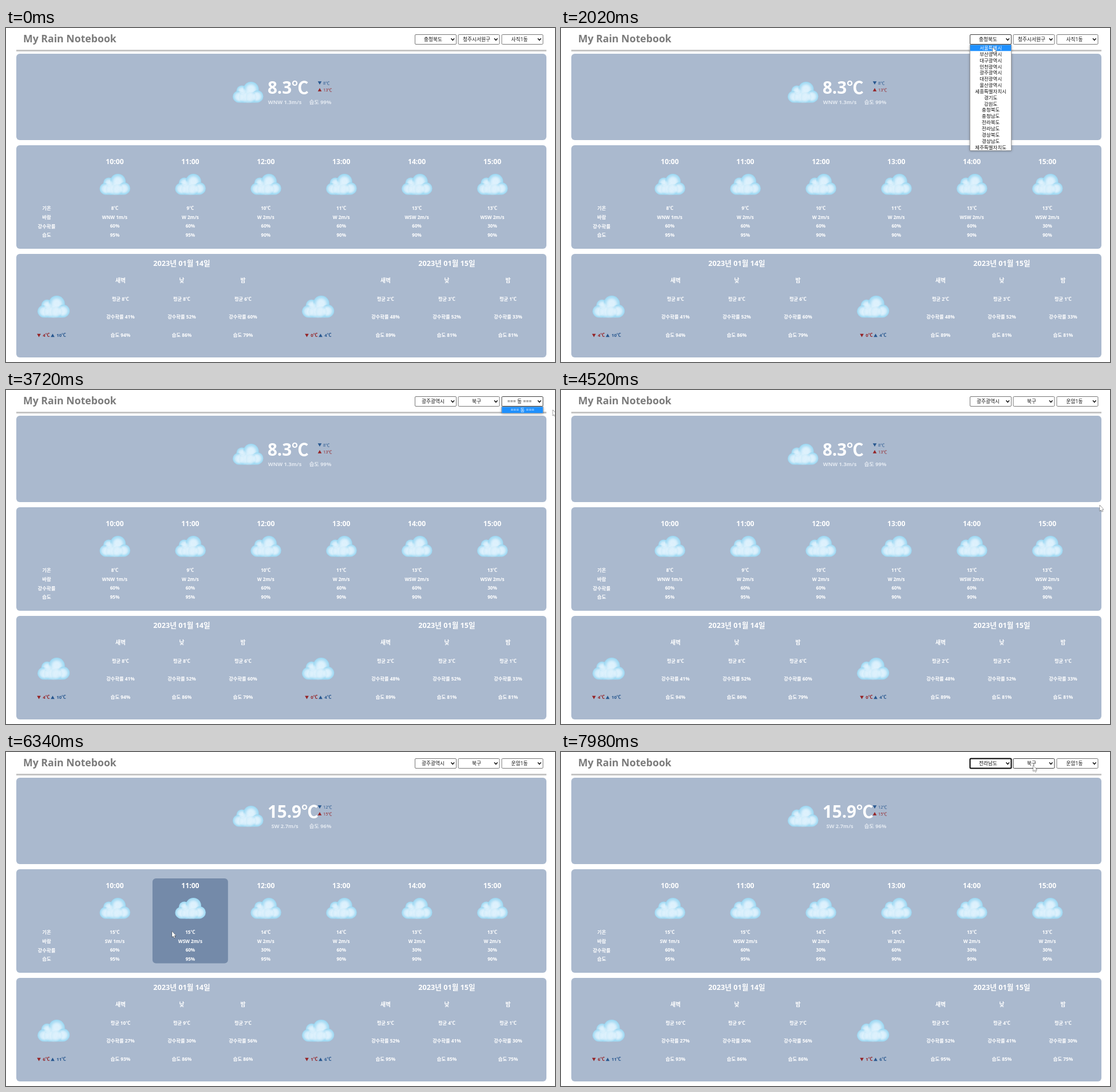
Recreate the animation shown at these times as an HTML page with a canvas. Size 959 px wide and 584 px high, loop 8000 ms.

```html
<!DOCTYPE html>
<html lang="ko">
<head>
<meta charset="utf-8">
<style>
html, body { margin: 0; width: 100%; height: 100%; overflow: hidden; background: #fff; }
canvas { display: block; }
</style>
</head>
<body>
<canvas id="stage" width="959" height="584"></canvas>
<script>
const ctx = document.getElementById('stage').getContext('2d');
const FONT = '"Open Sans", "Noto Sans CJK KR", "Noto Sans CJK", "Noto Sans", sans-serif';
const PANEL = '#aab9ce', HOVER = '#748aa9', RED = '#952326', BLUE = '#27578f';
const LOOP = 8000, ROW = 10.85, LIST_TOP = 29.5, CELL = 131.9;

const before = {
  temp: '8.3℃', wind: 'WNW 1.3m/s', humidity: '99%', low: '8℃', high: '13℃',
  hours: ['8℃|WNW 1m/s|60%|95%', '9℃|W 2m/s|60%|95%', '10℃|W 2m/s|60%|90%',
    '11℃|W 2m/s|60%|90%', '13℃|WSW 2m/s|60%|90%', '13℃|WSW 2m/s|30%|90%'],
  days: [
    { low: '4℃', high: '10℃', parts: ['8℃|41%|94%', '8℃|52%|86%', '6℃|60%|79%'] },
    { low: '0℃', high: '4℃', parts: ['2℃|48%|89%', '3℃|52%|81%', '1℃|33%|81%'] }]
};
const after = {
  temp: '15.9℃', wind: 'SW 2.7m/s', humidity: '96%', low: '12℃', high: '15℃',
  hours: ['15℃|SW 1m/s|60%|95%', '15℃|WSW 2m/s|60%|95%', '14℃|W 2m/s|30%|95%',
    '14℃|W 2m/s|60%|90%', '13℃|W 2m/s|30%|90%', '13℃|W 2m/s|30%|90%'],
  days: [
    { low: '6℃', high: '11℃', parts: ['10℃|27%|93%', '9℃|30%|86%', '7℃|56%|86%'] },
    { low: '1℃', high: '6℃', parts: ['5℃|52%|95%', '4℃|41%|85%', '1℃|30%|75%'] }]
};

const provinces = ('서울특별시 부산광역시 대구광역시 인천광역시 광주광역시 대전광역시 울산광역시 세종특별자치시 경기도 ' +
  '강원도 충청북도 충청남도 전라북도 전라남도 경상북도 경상남도 제주특별자치도').split(' ');
const cities = ('청주시서원구 청주시상당구 청주시흥덕구 청주시청원구 충주시 제천시 보은군 옥천군 영동군 ' +
  '증평군 진천군 괴산군 음성군 단양군').split(' ');
const districts = ['=== 구 ===', '동구', '서구', '남구', '북구', '광산구'];
const noTown = '=== 동 ===';
const towns = [noTown, ...('중흥1동 중흥2동 중흥3동 중앙동 임동 신안동 용봉동 운암1동 운암2동 운암3동 동림동 ' +
  '우산동 풍향동 문화동 문흥1동 문흥2동 두암1동 두암2동 두암3동').split(' ')];

// Each select: left edge, text centre, and [time, value] changes.
const selects = [
  { x: 714, mid: 746, values: [[0, '충청북도'], [2260, '광주광역시'], [7640, '전라남도']] },
  { x: 789.5, mid: 822, values: [[0, '청주시서원구'], [2720, '=== 구 ==='], [3260, '북구']] },
  { x: 865.5, mid: 897, values: [[0, '사직1동'], [2720, noTown], [4300, '운암1동']] }
];
const menus = [
  { select: 0, from: 1920, to: 2260, options: provinces },
  { select: 1, from: 2440, to: 2720, options: cities },
  { select: 1, from: 2880, to: 3260, options: districts },
  { select: 2, from: 3500, to: 3800, options: [noTown] },
  { select: 2, from: 3920, to: 4300, options: towns },
  { select: 0, from: 7220, to: 7640, options: provinces }
];

// Pointer visits: [time, x, y]
const visits = [
  [[260, 942, 122], [320, 905, 200], [450, 820, 290], [650, 480, 320], [820, 150, 330],
    [940, 260, 345], [1060, 440, 330], [1200, 468, 515], [1270, 472, 538], [1360, 475, 465],
    [1500, 560, 340], [1640, 700, 180], [1760, 810, 22], [1880, 760, 20], [1960, 754, 22],
    [2240, 752, 76], [2420, 826, 20], [2680, 829, 62], [2860, 830, 20], [3240, 826, 78],
    [3480, 905, 20], [3720, 955, 35], [3900, 915, 18], [4280, 909, 122], [4360, 910, 127],
    [4580, 952, 229], [4780, 952, 229]],
  [[5700, 950, 345], [5840, 898, 337], [6050, 700, 325], [6440, 150, 310], [6540, 180, 300],
    [6680, 360, 280], [6820, 620, 225], [6930, 800, 14], [7000, 745, 16], [7200, 742, 20],
    [7620, 740, 175], [7780, 775, 85], [7900, 822, 27], [8000, 825, 23]]
];

function pointerAt(t) {
  for (const path of visits) {
    const i = path.findIndex(p => p[0] > t);
    if (i < 1) continue;
    const [t0, x0, y0] = path[i - 1], [t1, x1, y1] = path[i];
    const k = (t - t0) / (t1 - t0);
    return { x: x0 + (x1 - x0) * k, y: y0 + (y1 - y0) * k };
  }
  return { x: -99, y: -99 };
}

// Text is placed by its vertical centre.
function text(s, x, y, size, color = '#fff', weight = 700, align = 'center') {
  ctx.font = `${weight} ${size}px ${FONT}`;
  ctx.textAlign = align;
  ctx.fillStyle = color;
  ctx.fillText(s, x, y + size * 0.36);
}

function box(x, y, w, h, r, color) {
  ctx.fillStyle = color;
  ctx.beginPath();
  ctx.roundRect(x, y, w, h, r);
  ctx.fill();
}

function triangle(x, y, dir, color) {
  ctx.fillStyle = color;
  ctx.beginPath();
  ctx.moveTo(x, y + dir * 2.7);
  ctx.lineTo(x + 6.6, y + dir * 2.7);
  ctx.lineTo(x + 3.3, y - dir * 2.9);
  ctx.fill();
}

function puff(x, y, r, inner, outer) {
  const g = ctx.createRadialGradient(x, y, 0, x, y, r);
  g.addColorStop(0, inner);
  g.addColorStop(0.5, inner);
  g.addColorStop(1, outer);
  ctx.fillStyle = g;
  ctx.beginPath();
  ctx.arc(x, y, r, 0, 7);
  ctx.fill();
}

function cloud(x, y, scale = 1) {
  ctx.save();
  ctx.translate(x, y);
  ctx.scale(scale, scale);
  box(3, 22, 47, 14.5, 7, '#a4dbf4');
  for (const [px, py, r] of [[16, 16, 9.5], [32, 13.5, 13.5], [10, 26, 10], [43, 25.5, 10.5], [20, 27, 9.5], [32, 27, 9.5]])
    puff(px, py, r, '#cdeafa', '#9ad7f2');
  for (const [px, py, r] of [[27, 25, 13], [13, 27, 9], [41, 26, 9], [32, 13, 9], [17, 17, 7]])
    puff(px, py, r, 'rgba(226,243,253,.75)', 'rgba(214,239,252,0)');
  ctx.restore();
}

function drawNow(data) {
  box(18, 45, 926, 151, 6, PANEL);
  cloud(396, 94);
  text(data.temp, 457, 104, 29.5, '#fff', 700, 'left');
  text(data.wind, 487, 130, 9.25, '#e3e9f1');
  text('습도 ' + data.humidity, 549, 130, 9.3, '#e3e9f1');
  triangle(544.7, 96, -1, BLUE);
  text(data.low, 554, 96, 7.3, BLUE, 400, 'left');
  triangle(544.7, 108, 1, RED);
  text(data.high, 554, 108, 7.3, RED, 400, 'left');
}

function drawHours(data, pointer) {
  box(18, 205, 926, 181, 6, PANEL);
  if (pointer && pointer.y > 221 && pointer.y < 370 && pointer.x > 124 && pointer.x < 916) {
    const cell = Math.floor((pointer.x - 124) / CELL);
    box(124 + cell * CELL, 221, CELL, 148.5, 6, HOVER);
  }
  const rowY = i => 315.3 + i * 15.6;
  ['기온', '바람', '강수확률', '습도'].forEach((s, i) => text(s, 71, rowY(i), 8.4));
  data.hours.forEach((hour, i) => {
    const x = 190 + i * CELL;
    text(`${10 + i}:00`, x, 234, 12.2);
    cloud(x - 26.5, 255);
    hour.split('|').forEach((s, row) => text(s, x, rowY(row), 8.1));
  });
}

function drawDays(data) {
  box(18, 395, 926, 181, 6, PANEL);
  data.days.forEach((day, d) => {
    const left = d * 463, lowX = d ? 522.2 : 54.2;
    text(`2023년 01월 ${14 + d}일`, 307 + left, 411.5, 12.7);
    cloud(55 + left - d, 468, 1.05);
    triangle(lowX, 537.5, -1, RED);
    text(day.low, lowX + 10, 537.5, 7.8, RED, 700, 'left');
    triangle(lowX + 24, 537.5, 1, BLUE);
    text(day.high, lowX + 34, 537.5, 7.8, BLUE, 700, 'left');
    day.parts.forEach((part, p) => {
      const x = 200 + left + p * 107;
      const [mean, rain, humidity] = part.split('|');
      text(['새벽', '낮', '밤'][p], x, 441.5, 9.8);
      text('평균 ' + mean, x, 474, 8.2);
      text('강수확률 ' + rain, x, 505.5, 8.3);
      text('습도 ' + humidity, x, 537.5, 8.3);
    });
  });
}

function valueOf(select, t) {
  return select.values.filter(v => v[0] <= t).pop()[1];
}

function drawSelect(select, t, pointer, open) {
  const { x, mid } = select;
  const hover = pointer.x > x && pointer.x < x + 73 && pointer.y > 11 && pointer.y < 29;
  const focused = select === selects[0] && t >= 7640;
  ctx.strokeStyle = focused ? '#000' : hover || open ? '#3c3c3c' : '#767676';
  ctx.lineWidth = focused ? 2 : 1;
  ctx.beginPath();
  ctx.roundRect(x + .5, 11.5, 72, 17, 1.5);
  ctx.stroke();
  text(valueOf(select, t), mid, 20, 8.7, '#111', 400);
  ctx.strokeStyle = '#111';
  ctx.lineWidth = 1.5;
  ctx.beginPath();
  ctx.moveTo(x + 63.5, 18.3);
  ctx.lineTo(x + 66.3, 21.3);
  ctx.lineTo(x + 69.1, 18.3);
  ctx.stroke();
}

function drawMenu({ select, options }, t, pointer) {
  const { x } = selects[select], height = options.length * ROW + 1;
  ctx.save();
  ctx.shadowColor = 'rgba(0,0,0,.35)';
  ctx.shadowBlur = 4;
  ctx.shadowOffsetY = 1;
  box(x, LIST_TOP - .5, 73, height, 0, '#777');
  ctx.restore();
  box(x + .7, LIST_TOP, 71.6, height - 1, 0, '#fff');
  let active = Math.floor((pointer.y - LIST_TOP) / ROW);
  if (pointer.x < x || pointer.x > x + 73 || !options[active])
    active = options.indexOf(valueOf(selects[select], t));
  options.forEach((s, i) => {
    const y = LIST_TOP + i * ROW;
    if (i === active) box(x + .7, y, 71.6, ROW, 0, '#1e90ff');
    text(s, x + 36.7, y + ROW / 2, 8.5, i === active ? '#fff' : '#111', 400);
  });
}

function drawStatus() {
  box(-4, 571, 291.5, 17, 3, '#dee1e6');
  text('om의 응답을 기다리는 중...', 0, 577.7, 8, '#444', 400, 'left');
}

function drawPointer({ x, y }) {
  ctx.save();
  ctx.translate(x + .5, y);
  ctx.fillStyle = '#fff';
  ctx.strokeStyle = '#222';
  ctx.lineWidth = .9;
  ctx.stroke(arrow);
  ctx.fill(arrow);
  ctx.restore();
}
const arrow = new Path2D('M0 0V9.8L2.2 7.9L3.7 11.3L5.2 10.6L3.7 7.3H6.7Z');

function render(now) {
  const t = now % LOOP;
  const data = t < 5320 ? before : after;
  const pointer = pointerAt(t);
  const menu = menus.find(m => t >= m.from && t < m.to);
  ctx.fillStyle = '#fff';
  ctx.fillRect(0, 0, 959, 584);
  text('My Rain Notebook', 30, 18.5, 17.7, '#7b7b7b', 700, 'left');
  box(18, 38, 926, 3, 0, '#c5c5c5');
  drawNow(data);
  drawHours(data, menu ? null : pointer);
  drawDays(data);
  selects.forEach((s, i) => drawSelect(s, t, pointer, menu && menu.select === i));
  if (menu) drawMenu(menu, t, pointer);
  if (t >= 2280 && t < 2720) drawStatus();
  drawPointer(pointer);
  requestAnimationFrame(render);
}
requestAnimationFrame(render);
</script>
</body>
</html>
```
